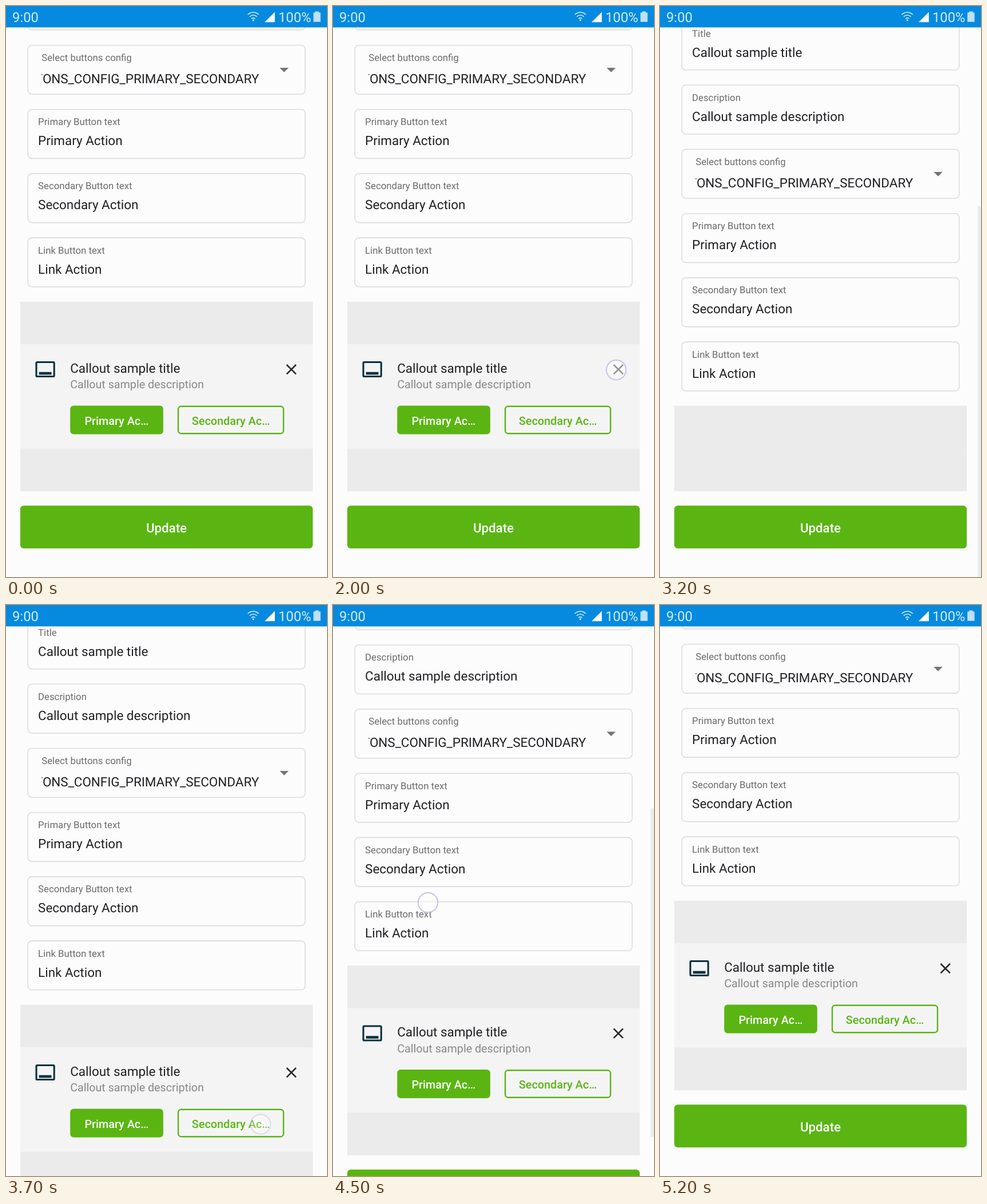
Animation, 561 px wide and 998 px high, one loop 5700 ms. Source, as an HTML page:

```html
<!DOCTYPE html>
<html lang="en">
<head>
<meta charset="utf-8">
<style>
  html, body { margin: 0; height: 100%; overflow: hidden; background: #fcfcfd; }
  svg { display: block; width: 561px; height: 998px; font-family: Roboto, sans-serif; text-rendering: geometricPrecision; }
  .box { fill: none; stroke: #dcdce1; stroke-width: 1.6; }
  .label { font-size: 16.75px; fill: #6c6c6f; }
  .value { font-size: 22.44px; fill: #212125; }
  .note { font-size: 19.7px; fill: #88888b; }
  .button { font-size: 19.8px; font-weight: 500; text-anchor: middle; }
  .grey { fill: #ebebeb; }
  .status { font-size: 23.8px; fill: #d3edfb; }
</style>
</head>
<body>
<svg viewBox="0 0 561 998">
  <clipPath id="selectClip"><rect x="62.3" y="100" width="390" height="50"/></clipPath>

  <g id="form">
    <g id="fields"></g>
    <g clip-path="url(#selectClip)">
      <text class="value" x="442.2" y="134.5" text-anchor="end">BUTTONS_CONFIG_PRIMARY_SECONDARY</text>
    </g>
    <path d="M478.3 108h15.6l-7.8 7.8z" fill="#757576"/>
    <rect class="grey" x="24.9" y="516.7" width="511.2" height="74.8"/>
  </g>

  <g id="callout">
    <rect x="24.9" y="591.3" width="511.2" height="182" fill="#f4f4f5"/>
    <rect x="53" y="622.5" width="31.2" height="25" rx="1.6" fill="none" stroke="#08323f" stroke-width="3.1"/>
    <path d="M57.7 639.7h21.8v4.7h-21.8z" fill="#08323f"/>
    <text class="value" x="112.2" y="640.8">Callout sample title</text>
    <text class="note" x="112.2" y="668">Callout sample description</text>
    <path d="M490.5 627l16.4 16.4M506.9 627l-16.4 16.4" stroke="#29292d" stroke-width="2.6"/>
    <rect x="112.2" y="698.6" width="162.6" height="49.8" rx="6" fill="#5ab512"/>
    <text class="button" x="193.3" y="731.6" fill="#fff">Primary Ac…</text>
    <rect x="301" y="699.8" width="184" height="47.4" rx="5" fill="none" stroke="#5ab512" stroke-width="2.4"/>
    <text class="button" x="393" y="731.6" fill="#5ab512">Secondary Ac…</text>
  </g>

  <g id="footer">
    <rect class="grey" x="24.9" y="773.3" width="511.2" height="75"/>
    <rect x="24.9" y="873.3" width="511.2" height="74.8" rx="6" fill="#5ab512"/>
    <text class="button" x="280.5" y="919.8" fill="#fff" style="font-size:22.3px">Update</text>
  </g>

  <rect id="thumb" x="555" width="6" fill="#ebebec"/>

  <rect width="561" height="37.4" fill="#058ae0"/>
  <text class="status" x="11" y="28.4">9:00</text>
  <text class="status" x="476" y="28.4">100%</text>
  <path d="M422.5 15q9.7-8 19.4 0M425.8 18.7q6.4-5.4 12.8 0M429 22.2q3.2-2.8 6.4 0" fill="none" stroke="#d3edfb" stroke-width="1.6"/>
  <circle cx="432.2" cy="24.8" r="1.5" fill="#d3edfb"/>
  <path d="M452 28.2h17.8v-17.8z" fill="#fff"/>
  <path d="M540.3 9.6h6.4v2h3v16.2h-12.4v-16.2h3z" fill="#bfe1f7"/>

  <circle id="touch" r="17.2" fill="#fff" fill-opacity=".5" stroke="#c9c7e6" stroke-width="2.2"/>
</svg>
<script>
const LOOP = 5700, STEP = 100, VIEW = 961, BAR = 37;
const CALLOUT = 182, CONTENT = 1607, END_SCROLL = CONTENT - VIEW;
const CLOSE_TAP = 2000, COLLAPSE = 2600, UPDATE_TAP = 3500, REOPEN = 3700, DRAG = 4300;
const $ = id => document.getElementById(id);

const fields = [
  ["Title", "Callout sample title"],
  ["Description", "Callout sample description"],
  ["Select buttons config", ""],
  ["Primary Button text", "Primary Action"],
  ["Secondary Button text", "Secondary Action"],
  ["Link Button text", "Link Action"]
];
$("fields").innerHTML = fields.map(([label, value], i) => {
  const y = 68.5 + (i - 2) * 112.2;
  return `<rect class="box" x="38.2" y="${y}" width="484.6" height="85.7" rx="7"/>
    <text class="label" x="${value ? 56.1 : 62.3}" y="${y + 27.4}">${label}</text>
    <text class="value" x="56.1" y="${y + 62.4}">${value}</text>`;
}).join("");

// Linear interpolation through [time, value] points, held at both ends.
function track(t, points) {
  const i = points.findIndex(p => p[0] > t);
  if (i < 0) return points[points.length - 1][1];
  if (i === 0) return points[0][1];
  const [t0, a] = points[i - 1], [t1, b] = points[i];
  return a + (b - a) * (t - t0) / (t1 - t0);
}

const smooth = x => (1 - Math.cos(Math.PI * Math.min(1, Math.max(0, x)))) / 2;

// A touch spot is solid while pressed and fades for 200 ms after release.
const press = (t, down, up) => t < down ? 0 : track(t, [[up, 1], [up + 200, 0]]);

function touchAt(t, shift) {
  if (t >= DRAG) return [166, 406.5 + shift, press(t, DRAG, 4500)];
  if (t >= UPDATE_TAP) return [445, 907.5, press(t, UPDATE_TAP, UPDATE_TAP + 100)];
  return [495, 636, press(t, CLOSE_TAP, CLOSE_TAP + 100)];
}

function draw(t) {
  const open = t < COLLAPSE || t >= REOPEN;
  const shift = t < COLLAPSE ? 0 :
    track(t, [[DRAG, CALLOUT], [4400, 155], [4500, 113.5], [4600, 40], [4700, 0]]);
  const move = (id, y) => $(id).setAttribute("transform", `translate(0 ${y})`);
  move("form", shift);
  move("callout", shift);
  move("footer", open ? shift : shift - CALLOUT);
  $("callout").setAttribute("opacity", t >= REOPEN ? 1 : 1 - smooth((t - 2225) / 300));

  const content = open ? CONTENT : CONTENT - CALLOUT;
  const thumb = $("thumb");
  thumb.setAttribute("y", BAR + (END_SCROLL - shift) / content * VIEW);
  thumb.setAttribute("height", VIEW * VIEW / content);
  thumb.setAttribute("opacity", t < COLLAPSE ? 0 :
    track(t, [[3200, 1], [3500, 0], [DRAG, 0], [4400, 1], [4850, 1], [5150, 0]]));

  const [x, y, strength] = touchAt(t, shift);
  const touch = $("touch");
  touch.setAttribute("cx", x);
  touch.setAttribute("cy", y);
  touch.setAttribute("opacity", strength);
}

const start = performance.now();
function tick() {
  const t = (performance.now() - start) % LOOP;
  draw(Math.floor(t / STEP) * STEP);
  requestAnimationFrame(tick);
}
tick();
</script>
</body>
</html>
```
